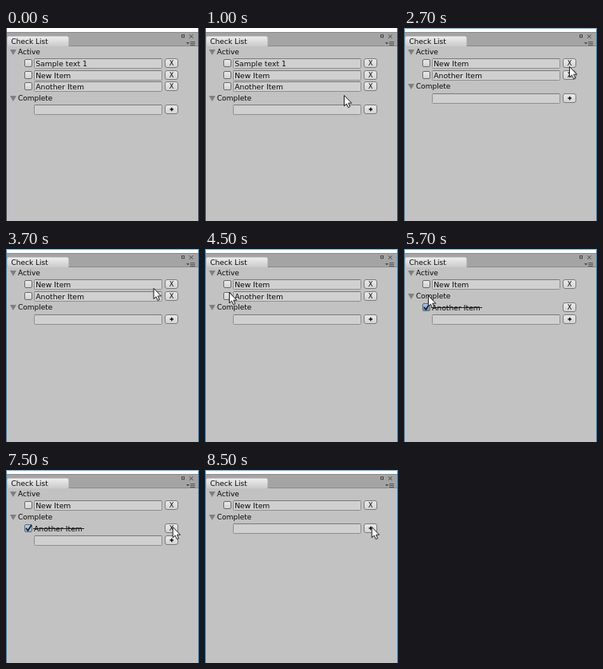
An HTML page with a canvas that plays this animation: 242x242 px, repeating every 9000 ms.

```html
<!DOCTYPE html>
<html lang="en">
<head>
<meta charset="utf-8">
<title>Check List</title>
<style>
  html, body { margin: 0; width: 100%; height: 100%; overflow: hidden; background: #c2c2c2; }
  canvas { display: block; width: 242px; height: 242px; }
</style>
</head>
<body>
<canvas id="stage"></canvas>
<script>
const LOOP = 9000, SIZE = 242, STEP = 125;
const FOCUS = 2500, DELETE = 2700, CHECK = 5500, COMPLETE = 5700,
      LEAVE = 6050, BLUR = 8050, PRESS = 8350, CLEAR = 8500;

const canvas = document.getElementById('stage');
const ctx = canvas.getContext('2d');
const ratio = window.devicePixelRatio || 1;
canvas.width = canvas.height = SIZE * ratio;

const rowY = row => Math.floor(30.4 + 14.4 * row);
const ease = p => p * p * (3 - 2 * p);
const mix = (a, b, p) => a + (b - a) * p;

// The pointer glides from one stop to the next and rests there.
const GLIDES = [
  { start: 350, end: 1000, x: 174, y: 84 },
  { start: 1350, end: 1850, x: 207, y: rowY(1) + 4 },
  { start: 3500, end: 4500, x: 30, y: rowY(2) - 5 },
  { start: 4700, end: 4850, x: 30, y: rowY(2) - 1 },
  { start: LEAVE, end: 7000, x: 215, y: rowY(3) - 1 },
  { start: 7200, end: 7500, x: 208.7, y: rowY(3) - 2 }
];

function rect(x, y, w, h, color) {
  ctx.fillStyle = color;
  ctx.fillRect(x, y, w, h);
}

function rounded(x, y, w, h, radius, fill, stroke) {
  ctx.beginPath();
  ctx.roundRect(x + .5, y + .5, w - 1, h - 1, radius);
  ctx.fillStyle = fill;
  ctx.fill();
  ctx.strokeStyle = stroke;
  ctx.lineWidth = 1;
  ctx.stroke();
}

function polygon(path, fill) {
  const shape = new Path2D(path);
  ctx.fillStyle = fill;
  ctx.fill(shape);
  return shape;
}

function line(path, color, width) {
  ctx.strokeStyle = color;
  ctx.lineWidth = width;
  ctx.stroke(new Path2D(path));
}

function shade(y, h, top, bottom) {
  const gradient = ctx.createLinearGradient(0, y, 0, y + h);
  gradient.addColorStop(0, top);
  gradient.addColorStop(1, bottom);
  return gradient;
}

function text(str, x, y, size = 9, align = 'left') {
  ctx.font = `${size}px "DejaVu Sans", sans-serif`;
  ctx.textAlign = align;
  ctx.fillStyle = '#080808';
  ctx.fillText(str, x, y + 3.3);
}

function header(label, row) {
  const y = rowY(row);
  polygon(`M5 ${y - 3}h8l-4 7z`, '#7f7f7f');
  text(label, 15, y);
}

function field(label, row) {
  const y = rowY(row);
  rounded(35, y - 6, 161, 13, 1, '#d0d0d0', '#8f8f8f');
  rect(36, y - 6, 159, 1, '#7a7a7a');
  text(label, 37.2, y + .6, 9.25);
}

function button(label, row, pressed) {
  const y = rowY(row) - 6;
  const fill = pressed ? shade(y, 12, '#8e8e8e', '#a8a8a8') : shade(y, 12, '#ececec', '#d2d2d2');
  rounded(199, y, 17, 12, 2.5, fill, '#7a7a7a');
  if (label === '+') line(`M205.5 ${y + 6}h4.5m-2.25 -2.25v4.5`, '#111', 1.4);
  else text(label, 207.7, y + 6, 8.3, 'center');
}

function checkbox(row, tint, checked) {
  const y = rowY(row) - 5;
  const fill = tint ? shade(y, 10, '#b5cdea', tint) : shade(y, 10, '#ececec', '#d0d0d0');
  rounded(23, y, 10, 10, 1.5, fill, '#6a6a6a');
  if (checked) line(`M25 ${y + 5}l2.5 3l4.5 -7`, '#101820', 1.6);
}

function windowFrame(focused) {
  rect(0, 0, SIZE, SIZE, '#c2c2c2');
  rect(0, 0, SIZE, 5, '#fff');
  rect(0, 5, SIZE, 18, '#a4a4a4');
  rect(0, 5, SIZE, 1, '#8a8a8a');
  rect(0, 22, SIZE, 1, '#8a8a8a');
  ctx.beginPath();
  ctx.roundRect(1.5, 10.5, 77, 12.5, [2, 2, 0, 0]);
  ctx.fillStyle = shade(10, 13, '#efefef', '#cacaca');
  ctx.fill();
  text('Check List', 6.5, 16.4);

  const edge = focused ? '#2484cc' : '#34455a';
  for (const x of [0, SIZE - 1]) rect(x, 0, 1, SIZE, edge);
  if (focused) rect(0, 0, SIZE, 1, '#6fb0e0');

  ctx.strokeStyle = '#444';
  ctx.lineWidth = 1;
  ctx.strokeRect(220.5, 8.7, 3, 3);
  line('M230 8.3l4.5 4.5m0 -4.5l-4.5 4.5', '#444', 1);
  polygon('M226 18h4l-2 2.5z', '#444');
  for (let y = 17; y < 22; y += 2) rect(231, y, 6, 1, '#555');
}

function pointer(t) {
  if (t < GLIDES[0].start) return;
  const index = GLIDES.findLastIndex(glide => t >= glide.start);
  const to = GLIDES[index];
  const from = GLIDES[index - 1] || { x: 245, y: 232 };
  const steps = Math.round((to.end - to.start) / STEP) + 1;
  const step = t >= to.end ? steps : Math.floor((t - to.start) / STEP) + 1;
  const p = ease(Math.min(1, step / steps));

  ctx.save();
  ctx.translate(mix(from.x, to.x, p), mix(from.y, to.y, p));
  const arrow = polygon('M.5 .5v13.3l3 -2.7 2.1 4.6 2.2 -1 -2 -4.5h4z', '#fff');
  ctx.strokeStyle = '#1c1c1c';
  ctx.lineWidth = 1;
  ctx.stroke(arrow);
  ctx.restore();
}

function completedItem(t, row) {
  const tint = t < LEAVE ? '#5f88bd' : t < BLUR ? '#8eb0d8' : null;
  checkbox(row, tint, true);
  text('Another Item', 35, rowY(row) + .6, 9.25);
  rect(34, rowY(row), 64, 1, '#222');
  button('X', row, t >= PRESS);
}

function draw(t) {
  ctx.setTransform(ratio, 0, 0, ratio, 0, 0);
  windowFrame(t >= FOCUS);

  const active = ['Sample text 1', 'New Item', 'Another Item'];
  if (t >= DELETE) active.shift();
  if (t >= COMPLETE) active.pop();

  let row = 0;
  header('Active', row++);
  for (const label of active) {
    checkbox(row, t >= CHECK && label === 'Another Item' ? '#5f88bd' : null);
    field(label, row);
    button('X', row, label === 'Sample text 1' && t >= FOCUS);
    row++;
  }

  header('Complete', row++);
  if (t >= COMPLETE && t < CLEAR) completedItem(t, row++);
  field('', row);
  button('+', row);
  pointer(t);
}

function tick() {
  draw(performance.now() % LOOP);
  requestAnimationFrame(tick);
}
tick();
</script>
</body>
</html>
```
